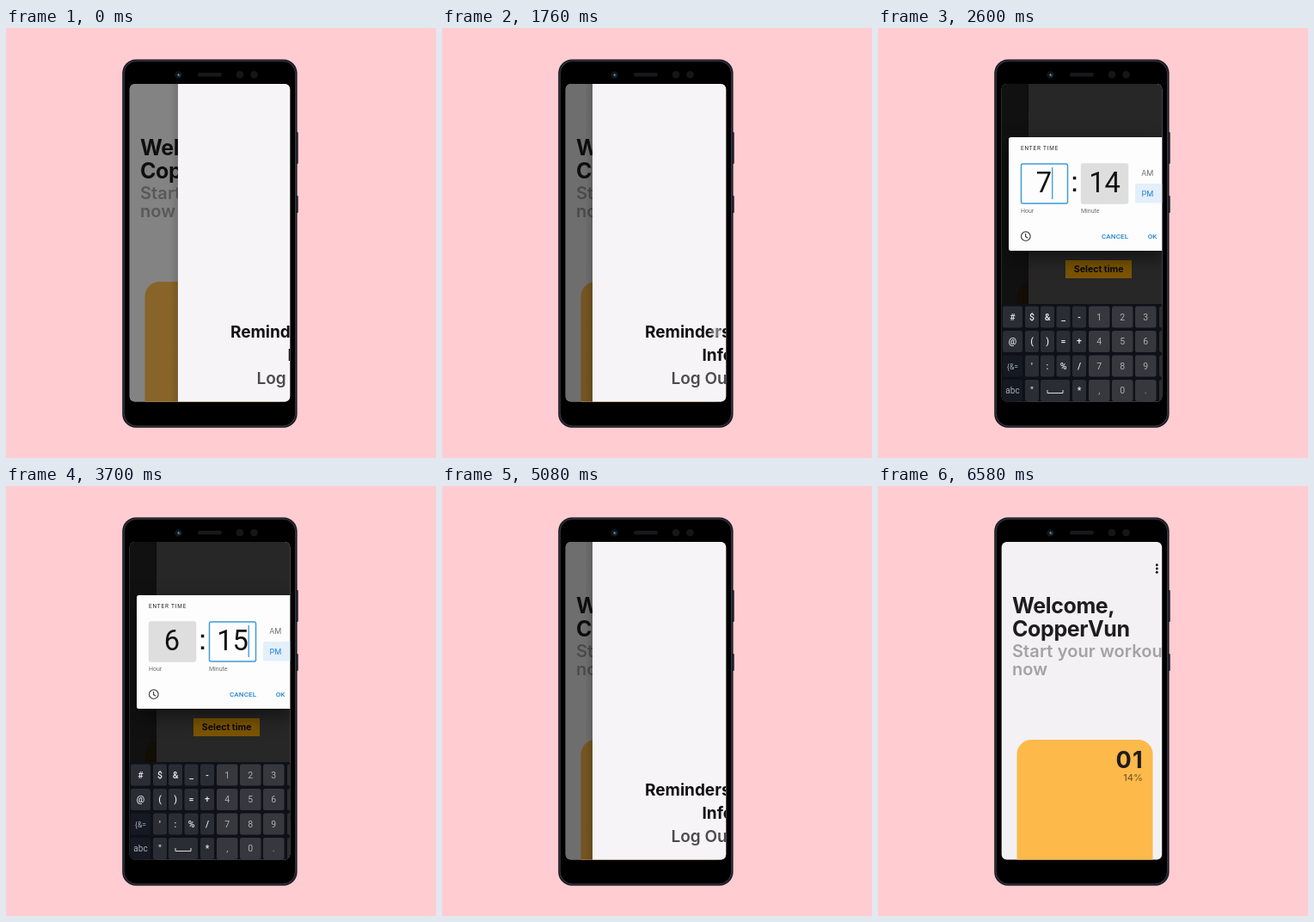
Animation of 500x500 px, one loop 6760 ms. Source, as an HTML page:

```html
<!DOCTYPE html>
<html lang="en">
<head>
<meta charset="utf-8">
<title>Workout reminder</title>
<style>
  html, body { margin: 0; width: 100%; height: 100%; overflow: hidden; background: #ffccd1; }
  svg { display: block; width: 100vw; height: 100vh; }
  text { font-family: Inter, "Open Sans", sans-serif; font-weight: 700; white-space: pre; }
  .semi text, text.semi { font-weight: 600; }
  .ui text { font-family: Roboto, Arial, sans-serif; font-weight: 400; }
  .ui .med { font-weight: 500; }
  .mid { text-anchor: middle; }
  .end { text-anchor: end; }
  .raised { filter: drop-shadow(0 8px 11px rgba(0, 0, 0, .55)); }
</style>
</head>
<body>
<svg viewBox="0 0 500 500">
  <defs>
    <clipPath id="screen"><rect x="143.7" y="65" width="186.5" height="369.6" rx="6"/></clipPath>
    <linearGradient id="shade">
      <stop offset="0" stop-color="#000" stop-opacity="0"/>
      <stop offset="1" stop-color="#000" stop-opacity=".13"/>
    </linearGradient>
  </defs>

  <rect width="500" height="500" fill="#ffccd1"/>

  <!-- phone -->
  <g fill="#2a2b37">
    <rect x="336" y="121" width="3.8" height="37" rx="1"/>
    <rect x="336" y="195" width="3.8" height="20" rx="1"/>
  </g>
  <rect x="135.2" y="36.5" width="203.4" height="428.2" rx="16" fill="#1b1b24"/>
  <rect x="137.2" y="38.3" width="199.4" height="424.6" rx="14.5" fill="#000" stroke="#444754" stroke-width=".9"/>
  <rect x="223" y="52" width="28" height="4.5" rx="2.2" fill="#19191b"/>
  <circle cx="200.5" cy="54.5" r="4.3" fill="#10151c"/>
  <circle cx="201" cy="55" r="1.8" fill="#28506e"/>
  <circle cx="200.4" cy="54.3" r=".7" fill="#9cc4dc"/>
  <circle cx="272" cy="54.3" r="4.3" fill="#181517"/>
  <circle cx="288.5" cy="54.3" r="4.3" fill="#181517"/>

  <g clip-path="url(#screen)">
    <!-- home -->
    <rect x="143" y="65" width="188" height="370" fill="#f3f1f3"/>
    <g fill="#1d1c1e" font-size="25" letter-spacing="-.4">
      <text x="156" y="147.5">Welcome,</text>
      <text x="156" y="174.5">CopperVun</text>
    </g>
    <g class="semi" fill="#a4a2a4" font-size="20" letter-spacing=".1">
      <text x="156" y="199">Start your workout</text>
      <text x="156" y="220">now</text>
    </g>
    <g fill="#1d1c1e">
      <circle cx="324.3" cy="91.8" r="1.5"/>
      <circle cx="324.3" cy="96" r="1.5"/>
      <circle cx="324.3" cy="100.2" r="1.5"/>
    </g>
    <rect x="161.5" y="295" width="158" height="160" rx="17" fill="#fdb94a"/>
    <text class="end" x="309" y="328" font-size="27" letter-spacing="1.3" fill="#1d1c1e">01</text>
    <text class="end" x="308" y="343" font-size="11" fill="#7d5c27" style="font-weight:500">14%</text>

    <!-- drawer, drawn at its open position -->
    <rect id="scrim" x="143" y="65" width="188" height="370"/>
    <g id="drawer">
      <rect x="166" y="65" width="9" height="370" fill="url(#shade)"/>
      <rect x="175" y="65" width="170" height="370" fill="#f6f4f7"/>
      <g font-size="19" fill="#111012">
        <text x="236" y="360">Reminders</text>
        <text x="302.5" y="387">Info</text>
        <text class="semi" x="266.5" y="414" fill="#4b4a4d">Log Out</text>
      </g>
    </g>

    <!-- reminder overlay -->
    <g id="overlay">
      <rect x="143" y="65" width="188" height="370" fill-opacity=".68"/>
      <rect x="218" y="270" width="77" height="21" fill="#f8aa00"/>
      <text class="mid" x="256.7" y="283.8" font-size="10.6" fill="#111">Select time</text>
    </g>

    <!-- time picker -->
    <g id="picker" class="ui">
      <rect x="143" y="65" width="188" height="370" fill-opacity=".5"/>
      <g id="dialog">
        <rect class="raised" x="152" y="127" width="182" height="132" rx="2.5" fill="#fdfdfd"/>
        <text x="166" y="142.3" font-size="6.4" letter-spacing=".85" fill="#222">ENTER TIME</text>
        <rect id="hourBox" x="166.5" y="158" width="54" height="46" rx="2" stroke-width="1.5"/>
        <rect id="minuteBox" x="236.5" y="158" width="54" height="46" rx="2" stroke-width="1.5"/>
        <g class="mid" font-size="32.6" fill="#111">
          <text id="hour" x="193" y="191.4"></text>
          <text id="minute" x="263.5" y="191.4"></text>
        </g>
        <rect id="caret" y="162" width="1.4" height="37" fill="#4d9fd6"/>
        <path d="M226.8 172.8h3.5v3.5h-3.5zM226.8 186.5h3.5v3.5h-3.5z" fill="#111"/>
        <g font-size="7" fill="#6c6c6c">
          <text x="166" y="215">Hour</text>
          <text x="236" y="215">Minute</text>
        </g>
        <rect x="299" y="181" width="34" height="22.5" rx="2" fill="#e3effb"/>
        <g class="mid" font-size="9.2">
          <text x="313.3" y="172.3" fill="#747474">AM</text>
          <text x="313.3" y="195.5" fill="#2a85d0">PM</text>
        </g>
        <g fill="none" stroke="#444" stroke-width="1.2">
          <circle cx="171.8" cy="242.2" r="5.3"/>
          <path d="M171.6 239v3.6l2.6 1.6"/>
        </g>
        <g font-size="8" fill="#1f82cc">
          <text class="med" x="260" y="245.2" letter-spacing=".15">CANCEL</text>
          <text class="med" x="313.8" y="245.2">OK</text>
        </g>
      </g>
    </g>
    <g id="keyboard" class="ui"></g>
  </g>

  <g id="touch">
    <circle r="7" fill="#fff" fill-opacity=".45"/>
    <circle r="5.3" fill="#dcdbe2" stroke="#b9b8c2" stroke-width=".8"/>
  </g>
</svg>

<script>
const LOOP = 6760;
const $ = id => document.getElementById(id);
const set = (id, attrs) => {
  for (const name in attrs) $(id).setAttribute(name, attrs[name]);
};

const clamp = v => Math.max(0, Math.min(1, v));
const ramp = (t, from, to) => clamp((t - from) / (to - from));
const easeOut = p => 1 - (1 - p) ** 3;
const easeInOut = p => p * p * (3 - 2 * p);
const during = (t, from, to) => t >= from && t < to;

function buildKeyboard() {
  const rows = ["# $ & _ - 1 2 3", "@ ( ) = + 4 5 6", "{&= ' : % / 7 8 9", "abc \" _ _ * , 0 ."];
  const lefts = [145, 171, 189, 207.5, 226, 245, 272, 299];
  let out = '<rect x="143" y="321" width="188" height="115" fill="#0e1118"/>';
  const key = (x, y, w, fill, id) =>
    `<rect ${id ? `id="${id}"` : ""} x="${x}" y="${y}" width="${w}" height="25" rx="2.5" fill="${fill}"/>`;

  rows.forEach((row, r) => {
    const y = 323.5 + r * 28.5;
    row.split(" ").forEach((label, c) => {
      const number = c > 4, space = r === 3 && (c === 2 || c === 3);
      const x = lefts[c], w = number ? 24.5 : c ? 16 : 23;
      if (space) {
        if (c === 2) out += key(x, y, 34, "#2a2d34") +
          `<path d="M${x + 8} ${y + 12}v3.5h18v-3.5" fill="none" stroke="#ddd"/>`;
        return;
      }
      const plain = c === 0 && r > 1;
      out += key(x, y, w, plain ? "#151922" : number ? "#36383e" : "#2a2d34", number ? "key" + label : "");
      const size = plain ? (r === 2 ? 8.5 : 10) : 10.5;
      const weight = number || plain ? "" : " med";
      out += `<text class="mid${weight}" x="${x + w / 2}" y="${y + 16.3}" font-size="${size}" ` +
        `fill="${number ? "#adafb4" : plain ? "#a9acb2" : "#ececee"}">${label.replace("&", "&amp;")}</text>`;
    });
    out += key(327, y, 20, "#2a2d34");
  });
  $("keyboard").innerHTML = out;
}

function drawDrawer(t) {
  const open = t < 6240
    ? 0.847 + 0.153 * easeOut(ramp(t, 80, 280))
    : 1 - easeInOut(ramp(t, 6220, 6570));
  set("drawer", {
    transform: `translate(${(1 - open) * 163} 0)`,
    visibility: open > 0 ? "visible" : "hidden"
  });
  set("scrim", { "fill-opacity": 0.54 * open });
}

function drawField(name, focused) {
  set(name + "Box", {
    fill: focused ? "#fdfdfd" : "#dedede",
    stroke: focused ? "#3d9bdc" : "#dedede"
  });
}

function drawPicker(t) {
  set("overlay", { opacity: ramp(t, 1850, 1970) * (1 - ramp(t, 4480, 4780)) });
  set("picker", { opacity: t < 3740 ? ramp(t, 1990, 2120) : 0 });

  const rise = easeOut(ramp(t, 2390, 2580));
  const drop = ramp(t, 3740, 3960);
  set("dialog", { transform: `translate(0 ${57 * (1 - rise)})` });
  set("keyboard", {
    transform: `translate(0 ${115 * (1 - rise + drop)})`,
    visibility: during(t, 2390, 3960) ? "visible" : "hidden"
  });

  const hour = t < 2720 ? "7" : t < 2880 ? "" : "6";
  const minute = t < 3300 ? "14" : t < 3500 ? "1" : "15";
  const onHour = t < 3120;
  $("hour").textContent = hour;
  $("minute").textContent = minute;
  drawField("hour", onHour);
  drawField("minute", !onHour);
  const value = onHour ? hour : minute;
  set("caret", { x: (onHour ? 193 : 263.5) + value.length * 9 });
  set("key6", { fill: during(t, 2840, 2940) ? "#5b5e66" : "#36383e" });
  set("key5", { fill: during(t, 3460, 3560) ? "#5b5e66" : "#36383e" });
}

function drawTouch(t) {
  const onMenu = t < 4000;
  const fade = onMenu
    ? 0.5 * during(t, 1760, 1960) * (1 - ramp(t, 1860, 1960))
    : during(t, 6160, 6340) * (1 - ramp(t, 6240, 6340));
  set("touch", {
    transform: onMenu ? "translate(319 354)" : "translate(158 295.5)",
    opacity: fade
  });
}

function draw(now) {
  const t = now % LOOP;
  drawDrawer(t);
  drawPicker(t);
  drawTouch(t);
}

buildKeyboard();
const start = performance.now();
function tick() {
  draw(performance.now() - start);
  requestAnimationFrame(tick);
}
tick();
</script>
</body>
</html>
```
